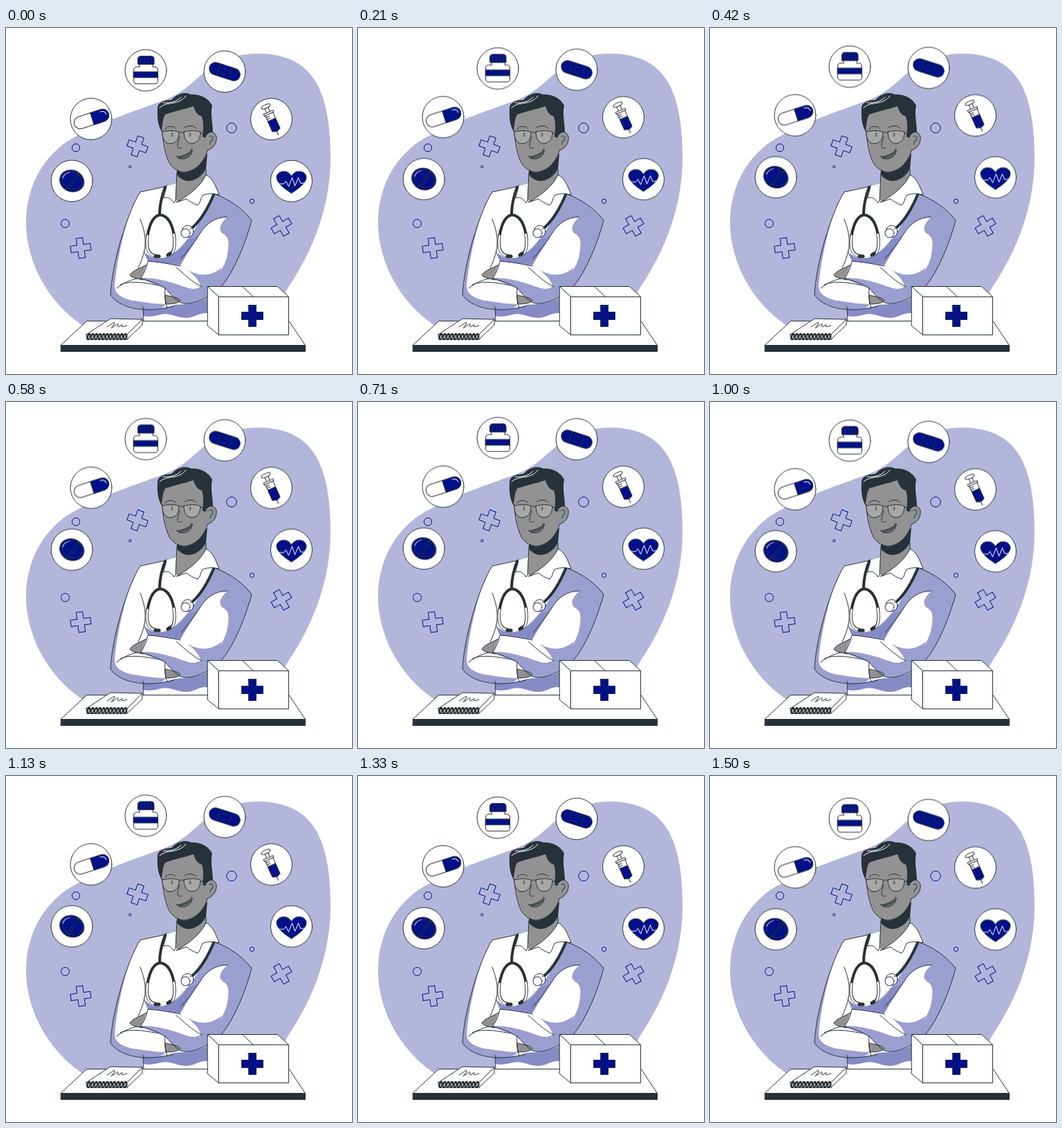
An HTML page for the animation above (1.54 s loop, 500 by 500 pixels).

```html
<!DOCTYPE html>
<html lang="en">
<head>
<meta charset="utf-8">
<title>Doctor at the desk</title>
<style>
  html, body { margin: 0; width: 100%; height: 100%; overflow: hidden; background: #fff; }
  svg { display: block; width: 100vw; height: 100vh; }
  .ink { fill: none; stroke: #263238; stroke-width: 1; stroke-linecap: round; stroke-linejoin: round; }
  .paper { fill: #fff; }
  .navy { fill: #02108a; }
  .dark { fill: #263238; }
  .skin { fill: #929292; }
  .shade { fill: #9a9fd0; }
  .deep { fill: #858bc5; }
  .mark { fill: none; stroke: #02108a; stroke-width: 1; }
  .white { fill: none; stroke: #fff; stroke-width: 1; stroke-linecap: round; stroke-linejoin: round; }
  .tube { fill: none; stroke: #263238; stroke-width: 4; stroke-linecap: round; }

  /* Linear rise and fall of 10px, drawn at 24 poses per second */
  .float { animation: float 1540ms -8ms infinite; }
  @keyframes float {
    0% { transform: translateY(0); animation-timing-function: steps(17); }
    45.946% { transform: translateY(-9.19px); animation-timing-function: steps(18); }
    94.595%, 100% { transform: translateY(.54px); }
  }
</style>
</head>
<body>
<svg viewBox="0 0 500 500">
  <defs>
    <path id="plus" d="M-4.700-14.500H4.700V-4.700H14.500V4.700H4.700V14.500H-4.700V4.700H-14.500V-4.700H-4.700Z"/>
    <circle id="badge" r="30" class="ink" style="fill:#fff"/>
    <pattern id="coil" x="117" y="440" width="5.25" height="12" patternUnits="userSpaceOnUse">
      <ellipse cx="2.600" cy="6" rx="1.600" ry="4.300" transform="rotate(14 2.6 6)" fill="none" stroke="#1b2327" stroke-width="1.900"/>
    </pattern>
  </defs>

  <path fill="#b3b6da" d="M128 440C66 408 29 342 29 281C29 222 61 176 104 155C146 132 195 117 232 103C262 90 275 72 293 59C330 30 398 30 430 57C460 82 469 130 469 188C469 252 447 317 409 373L370 440Z"/>

  <g class="mark">
    <use href="#plus" transform="translate(190 171) rotate(20)"/>
    <use href="#plus" transform="translate(108 318) rotate(-8)"/>
    <use href="#plus" transform="translate(398 286) rotate(-30)"/>
    <circle cx="101" cy="173" r="5.600"/>
    <circle cx="179.300" cy="200.500" r="1.700"/>
    <circle cx="85.500" cy="282.500" r="6"/>
    <circle cx="326" cy="144.500" r="7.200"/>
    <circle cx="355.400" cy="250.300" r="3.200"/>
  </g>

  <!-- table -->
  <path class="ink" style="fill:#fff" d="M117 423.500H409L432.500 458.500H79.500Z"/>
  <path class="ink" style="fill:#263238" d="M79.500 458.500H432.500V467.500H79.500Z"/>

  <!-- coat -->
  <path class="paper" d="M231 229L194 237C176 265 153 340 151 386C160 399 178 405 198 407V423H310V372C329 352 347 308 355 278C340 262 320 246 299 239L289 212Z"/>
  <path class="shade" d="M299 239C323 247 343 262 355 278C347 308 331 350 311 374H293C304 362 314 348 319 332C322 316 324 304 315 298C306 293 308 284 320 273C302 273 289 283 281 296C273 309 263 322 254 332L226 333C245 327 258 311 268 298C278 284 290 262 299 239Z"/>
  <path class="deep" d="M197 319C203 330 215 334 228 332C243 329 254 318 262 306C269 303 274 303 279 299C272 311 261 327 252 343L205 337Z"/>
  <path class="shade" d="M178 270C164 304 153 345 151 386C160 399 178 405 204 407C221 407 230 404 230 399C215 399 200 396 184 394C169 391 157 385 157 373C159 345 167 306 178 270Z"/>
  <path class="deep" d="M198 404C212 409 230 405 244 400C261 399 277 398 291 390V412C279 411 273 418 262 419C245 419 238 411 224 414C213 417 205 418 199 416Z"/>
  <path class="ink" d="M231 229L194 237C176 265 153 340 151 386C160 399 178 405 198 407C213 408 231 405 242 402M198 403L199 423M299 239C323 247 343 262 355 278C347 308 331 350 311 374"/>
  <path class="ink" d="M194 276C200 292 203 305 200 322C198 331 194 340 191 347M320 273C302 273 289 283 281 296C273 309 263 322 253 333M160 376C171 367 184 362 198 361M165 371C182 363 210 370 230 374"/>

  <!-- crossed arms -->
  <path class="ink" style="fill:#929292" d="M204 341C197 347 184 349 179 357C181 361 189 362 198 364Z"/>
  <path class="shade" d="M205 337L252 344L291 374V389C282 393 271 399 257 398C248 397 240 387 230 376C219 372 207 367 194 362Z"/>
  <path class="paper" d="M205 337C222 338 238 341 252 344L284 365C288 372 277 379 264 376C245 370 225 361 196 361Z"/>
  <path class="shade" d="M262 349C275 357 293 362 312 346C307 360 301 370 291 376L281 374C281 367 273 358 262 349Z"/>
  <path class="ink" style="fill:#929292" d="M230 386C238 388 249 389 252 394C249 398 240 399 231 399Z"/>
  <path class="ink" d="M252 344C237 341 221 338 205 337C203 347 199 356 194 362C214 367 223 372 230 376C240 387 248 397 257 398C271 399 282 393 291 389M246 346C259 357 269 367 283 374M230 376C229 385 230 397 233 404"/>

  <!-- neck and collar -->
  <path class="skin" d="M247 204L245 249L252 251L289 220V180Z"/>
  <path class="ink" d="M247 209L245 249M289 204V214"/>
  <path class="dark" d="M247 205C262 211 279 201 291 181L289 203C283 215 272 222 262 221C255 220 250 216 247 212Z"/>
  <path class="ink" style="fill:#fff" d="M289 212C298 216 303 228 308 241C299 239 290 239 284 242C281 247 281 253 277 256C271 254 265 251 261 247L246 252C260 245 282 229 289 212Z"/>
  <path class="ink" style="fill:#fff" d="M232 227C231 236 228 242 228 246C234 243 239 247 243 253L245 249"/>

  <!-- stethoscope -->
  <path class="tube" d="M230 230C225 243 222 255 222 269M300 241C292 260 281 278 270 288"/>
  <path class="tube" d="M204.500 300C208 280 214 271 223 270C233 271 240 282 242.500 298"/>
  <path class="ink" style="stroke-width:4.500" d="M204.500 299C202 317 205 328 216 329M242.500 297C245 314 243 326 236 327"/>
  <path class="white" style="stroke-width:2.600" d="M204.500 300C202 317 205 328 215 329M242.500 298C245 314 243 326 237 327"/>
  <path class="tube" style="stroke-width:5" d="M216 330L221 330M234 328L237 326"/>
  <circle class="ink" style="fill:#fff" cx="262.500" cy="294" r="8.500"/>
  <circle class="ink" style="fill:#fff" cx="259.500" cy="296.500" r="6.500"/>
  <path class="ink" d="M266 290L271 288"/>

  <!-- head -->
  <path class="ink" style="fill:#929292" d="M288 155C293 148 302 149 304 157C305 167 299 175 290 177Z"/>
  <path class="skin" d="M226 122C225 145 227 166 232 184C236 199 245 207 257 209C273 208 285 195 291 177L294 150L284 112L258 106Z"/>
  <path class="ink" d="M226 148C226 163 230 184 237 197C245 207 256 211 267 206C279 201 288 190 291 177M294 157C298 154 300 157 298 163C296 162 295 165 295 168"/>
  <path class="dark" d="M225 150C220 142 218 130 219 117C218 108 228 104 239 104C246 96 257 91 267 96C282 95 294 103 298 112C295 124 299 139 299 151C293 150 290 154 288 159L284 157C285 147 286 137 283 128C276 126 273 120 271 113C257 118 243 120 230 125C226 132 226 141 225 150Z"/>
  <path class="white" d="M222 115C232 107 241 110 250 106C255 104 258 101 260 98M227 108C238 109 247 106 253 100"/>
  <path class="ink" d="M230 146C235 141 241 141 245 145M258 144C264 140 271 141 275 145"/>
  <path class="ink" d="M251 157C250 164 246 169 249 173C251 174 253 174 254 173"/>
  <ellipse class="dark" cx="240" cy="154" rx="1.500" ry="3.300"/>
  <ellipse class="dark" cx="266" cy="154" rx="1.500" ry="3.300"/>
  <g class="ink" style="fill:#c4c4c4;fill-opacity:.45">
    <path d="M225.500 150C233 148 243 148 250 150C250 159 247 166 239 167C230 168 226 161 225.500 150Z"/>
    <path d="M257 150C265 148 274 148 281 150C281 159 278 166 269 167C261 167 257 160 257 150Z"/>
    <path style="fill:none" d="M250 152C252 150 255 150 257 152M281 152L289 153"/>
  </g>
  <path class="ink" style="fill:#686b6d" d="M247 186C255 186 264 181 269 176C269 185 261 190 253 189C250 189 248 188 247 186Z"/>
  <path class="ink" d="M251 188C257 185 263 184 268 180M267 175L270 177"/>

  <!-- box -->
  <g class="ink" style="fill:#fff" transform="translate(.5 .5)">
    <path d="M291 373H392L408 388H307Z"/>
    <path d="M291 373L307 388V443L291 430Z"/>
    <path d="M307 388H408V443H307Z"/>
    <path d="M341 373L357 388"/>
    <path style="fill:#02108a" d="M350 400H361V410H371V421H361V431H350V421H340V410H350Z"/>
  </g>

  <!-- notepad -->
  <g class="ink" style="fill:#fff">
    <path d="M116 443L117 450H175L197 429V421Z"/>
    <path d="M116 443L151 420L197 421L175 443Z"/>
    <path d="M175 443V450"/>
    <path style="fill:none" d="M146 432C151 430 158 422 157 427L152 434C157 431 163 425 162 429C160 434 164 432 168 428C165 434 169 431 175 430"/>
  </g>
  <path fill="url(#coil)" d="M117 440H174.750V452H117Z"/>

  <g class="float">
    <!-- bottle -->
    <g transform="translate(202 61.200)">
      <use href="#badge"/>
      <path class="ink" style="fill:#fff" d="M-9-9H10V-5H13Q17.500-5 17.500 0V15Q17.500 19.500 13 19.500H-13Q-17.500 19.500-17.500 15V0Q-17.500-5-13-5H-9Z"/>
      <path class="ink" style="fill:#02108a" d="M-17.500 2H17.500V10.500H-17.500Z"/>
      <path class="ink" style="fill:#02108a" d="M-11.500-9V-16Q-11.500-20.500-7-20.500H8Q12-20.500 12-16V-9Z"/>
      <path class="ink" d="M-7-18V-10M-2-18V-10M3-18V-10M8-18V-10"/>
    </g>

    <!-- plaster -->
    <g transform="translate(316 63)">
      <use href="#badge"/>
      <g class="ink" transform="rotate(18)">
        <rect x="-23" y="-9" width="46" height="18" rx="9" style="fill:#02108a"/>
        <path d="M-9-9V9M9-9V9M-4-4H4M-4 4H4"/>
      </g>
    </g>

    <!-- capsule -->
    <g transform="translate(123.500 131.500)">
      <use href="#badge" x="-.5"/>
      <g class="ink" transform="rotate(-18)">
        <rect x="-26" y="-9" width="52" height="18" rx="9" style="fill:#fff"/>
        <path style="fill:#02108a" d="M1-9H17A9 9 0 0 1 17 9H1Z"/>
        <path class="white" d="M15-6C19-6 22-4 22.500 0"/>
      </g>
    </g>

    <!-- syringe -->
    <g transform="translate(383.500 131.700)">
      <use href="#badge"/>
      <g class="ink" transform="rotate(-24)" style="fill:#fff">
        <path d="M-2.500-19H2.500V-10H-2.500Z"/>
        <ellipse cy="-20" rx="7" ry="2.500"/>
        <path d="M-7.500-11H7.500V-8H-7.500Z"/>
        <path d="M-6-8H6V17H-6Z"/>
        <path style="fill:#02108a" d="M-6 1H6V17L2 19H-2L-6 17Z"/>
        <path d="M0 19V25M-6-5H-1M-6-2H-1"/>
      </g>
    </g>

    <!-- tablet -->
    <g transform="translate(95.200 221)">
      <use href="#badge"/>
      <g class="ink" transform="rotate(22)">
        <ellipse rx="18" ry="15.500" style="fill:#02108a"/>
        <ellipse cx="1" cy="-1" rx="15" ry="12.500"/>
        <path d="M4-14L-3 14M7-13L0 14"/>
        <path class="white" d="M-14 1C-14-5-11-8-8-10"/>
      </g>
    </g>

    <!-- heart -->
    <g transform="translate(412.500 221.200)">
      <use href="#badge"/>
      <path class="ink" style="fill:#02108a" d="M0 17.500C-9 12-21 3-21.500-5C-21.500-11-16-14-11-14C-6-14-2-11 0-7C2-11 6-14 11-14C16-14 21.500-11 21.500-5C21 3 9 12 0 17.500Z"/>
      <path class="white" d="M-18 4H-11L-8 0L-4 8L1-5L5 7L10-5L13 3H18"/>
    </g>
  </g>
</svg>
</body>
</html>
```
